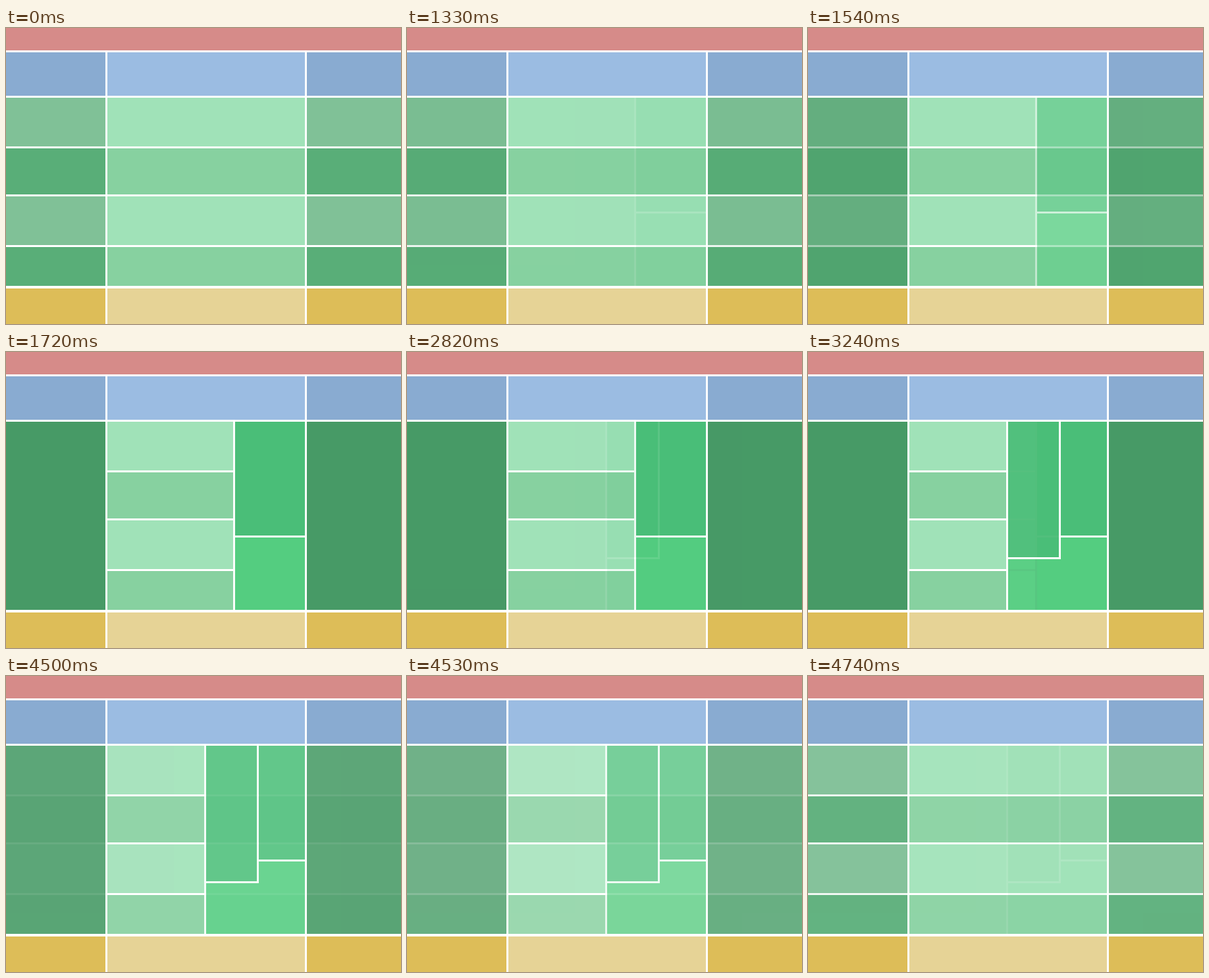
These frames come from a looping animation (600x450 px, 4.86 s). An HTML page:

```html
<!DOCTYPE html>
<html lang="en">
<head>
<meta charset="utf-8">
<title>Layout grid</title>
<style>
  html, body { margin: 0; width: 100%; height: 100%; overflow: hidden; background: #fff; }
  svg { display: block; width: 600px; height: 450px; }
</style>
</head>
<body>
<svg id="stage" viewBox="0 0 600 450" shape-rendering="crispEdges"></svg>
<script>
const LOOP = 4860;
const NS = 'http://www.w3.org/2000/svg';
const stage = document.getElementById('stage');

const PALE = '#a0e2b8', SOFT = '#87d1a0', DULL = '#80c197', MID = '#59ae78';
const DEEP = '#479a66', RICH = '#4abe78', BRIGHT = '#54cd80';
const ROWS = [[106, 180], [183, 253], [256, 330], [333, 392]];

function group() {
  return stage.appendChild(document.createElementNS(NS, 'g'));
}

// Edges rather than sizes: left, top, right, bottom
function box(g, x1, y1, x2, y2, fill, alpha = 1) {
  const r = document.createElementNS(NS, 'rect');
  const attrs = { x: x1, y: y1, width: x2 - x1, height: y2 - y1, fill, 'fill-opacity': alpha };
  for (const k in attrs) r.setAttribute(k, attrs[k]);
  g.append(r);
}

function band(g, y1, y2, side, centre) {
  box(g, 0, y1, 151, y2, side);
  box(g, 154, y1, 454, y2, centre);
  box(g, 457, y1, 600, y2, side);
}

function layer() {
  const g = group();
  box(g, 0, 106, 600, 392, '#fff');
  return g;
}

function stripes() {
  const g = layer();
  ROWS.forEach(([a, b], i) => band(g, a, b, i % 2 ? MID : DULL, i % 2 ? SOFT : PALE));
  return g;
}

function columns(edge) {
  const g = layer();
  box(g, 0, 106, 151, 392, DEEP);
  box(g, 457, 106, 600, 392, DEEP);
  ROWS.forEach(([a, b], i) => box(g, 154, a, edge, b, i % 2 ? SOFT : PALE));
  return g;
}

function twoBlocks() {
  const g = columns(345);
  box(g, 348, 106, 454, 279, RICH);
  box(g, 348, 282, 454, 392, BRIGHT);
  return g;
}

function threeBlocks() {
  const g = columns(301);
  box(g, 304, 106, 381, 312, RICH);
  box(g, 384, 106, 454, 279, RICH);
  box(g, 384, 282, 454, 392, BRIGHT);
  box(g, 304, 315, 384, 392, BRIGHT);
  return g;
}

// Faint trace left where the old column edge was
function trace() {
  const g = group(), tint = '#5abf80';
  for (const [a, b] of [[106, 312], [315, 392]]) {
    box(g, 304, a, 345, b, '#fff', 0.045);
    box(g, 345, a, 348, b, tint, 0.5);
  }
  for (const y of [180, 253, 330]) box(g, 304, y, 345, y + 3, tint, 0.5);
  box(g, 348, 279, 381, 282, tint, 0.5);
  return g;
}

// Held opacity values: [time, value] pairs
function track(el, steps) {
  const frames = steps.map(([t, v]) => ({ offset: t / LOOP, opacity: v, easing: 'steps(1, end)' }));
  frames.push({ offset: 1, opacity: steps[steps.length - 1][1] });
  el.animate(frames, { duration: LOOP, iterations: Infinity }).startTime = 0;
}

// Eight equally spaced steps from one level to another
function ramp(start, end, from, to, map = p => p) {
  return Array.from({ length: 8 }, (_, i) => [
    Math.round((start + (end - start) * i / 7) / 10) * 10,
    map(from + (to - from) * i / 7)
  ]);
}

const frame = group();
box(frame, 0, 0, 600, 34, '#d68b89');
band(frame, 37, 103, '#89abd1', '#9bbce2');
band(frame, 396, 450, '#ddbd58', '#e6d396');

// The last dissolve passes through white, strongest halfway
const weight = p => p * (1 - p + p * p);
const under = p => weight(1 - p) / (1 - weight(p));

const first = stripes(), second = twoBlocks(), third = threeBlocks();
const ghost = trace(), last = stripes();

track(first, [[0, 1], [3240, 0]]);
track(second, [[0, 0], ...ramp(1330, 1720, 0.1, 1), [3240, 0]]);
track(third, [[0, 0], ...ramp(2820, 3240, 0.1, 1), ...ramp(4500, 4740, 0.1, 0.92, under)]);
track(ghost, [[0, 0], [3240, 1], [4500, 0]]);
track(last, [[0, 0], ...ramp(4500, 4740, 0.1, 0.92, weight)]);
</script>
</body>
</html>
```
